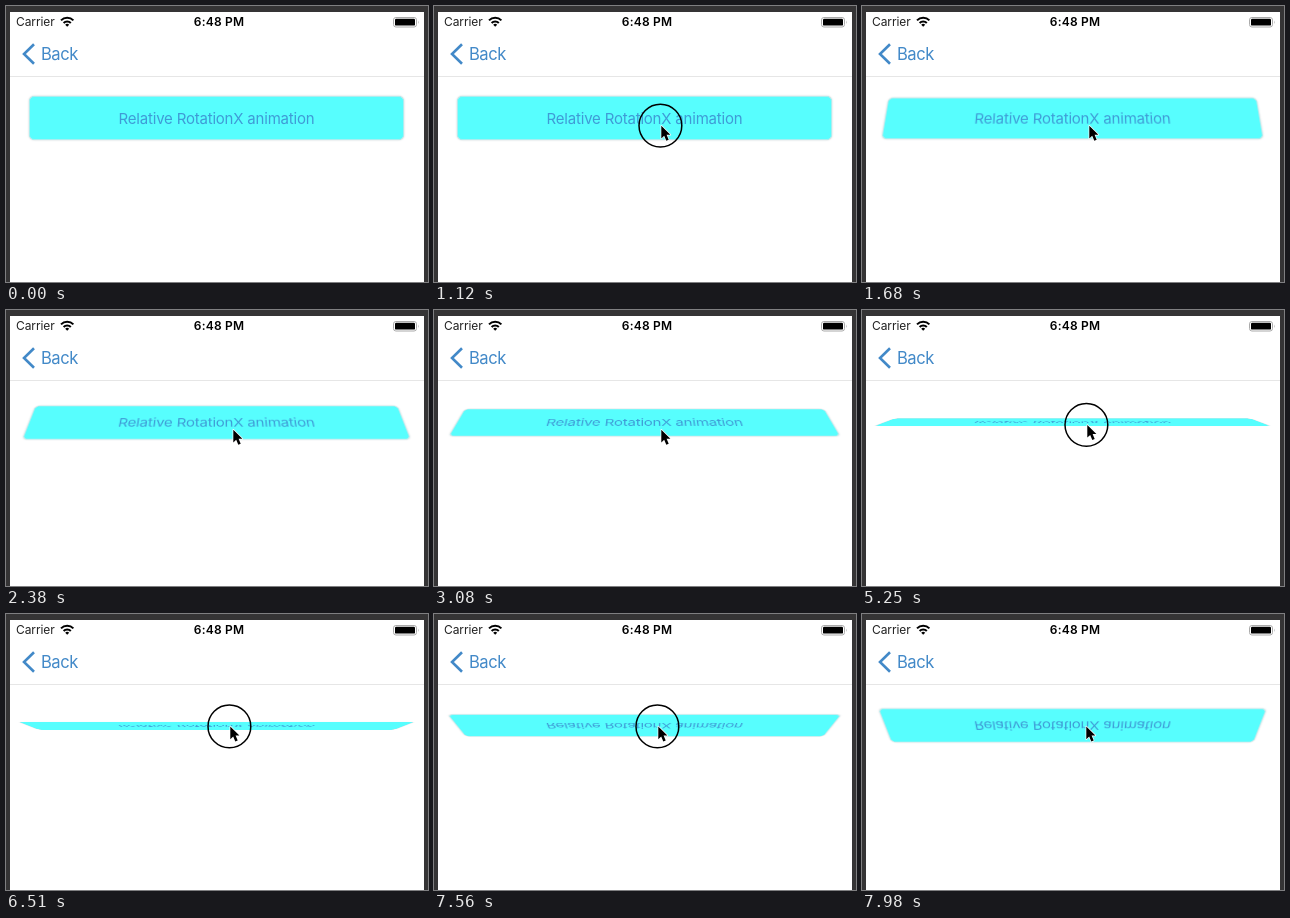
Animation, 422 px wide and 276 px high, one loop 8000 ms. Source, as an HTML page:

```html
<!DOCTYPE html>
<html lang="en">
<head>
<meta charset="utf-8">
<title>Relative RotationX animation</title>
<style>
  html, body { margin: 0; width: 100%; height: 100%; overflow: hidden; background: #353435; }
  body { position: relative; font-family: Inter, Roboto, sans-serif; }
  svg { position: absolute; left: 0; top: 0; width: 422px; height: 276px; }
  .button {
    position: absolute; left: 23px; top: 90px; width: 375px; height: 44px;
    box-sizing: border-box; border: 1px solid #a9eef0; border-radius: 5px;
    display: flex; align-items: center; justify-content: center;
    background: #57fefe; color: #3f9bd6;
    box-shadow: 0 0 2px rgba(110, 140, 145, .45);
    font-size: 15px; letter-spacing: -.2px; white-space: nowrap;
  }
</style>
</head>
<body>
<svg viewBox="0 0 422 276">
  <rect x="4" y="6" width="414" height="270" fill="#fff"/>
  <rect x="4" y="70" width="414" height="1" fill="#e6e6e6"/>
  <text x="10" y="20.4" font-size="12" fill="#222" letter-spacing="-.1">Carrier</text>
  <g fill="none" stroke="#000" stroke-width="2">
    <path d="M55 14.4a8.6 8.6 0 0 1 12.4 0"/>
    <path d="M57.6 17a5 5 0 0 1 7.2 0"/>
  </g>
  <path d="M59.2 18.7a2.8 2.8 0 0 1 4 0l-2 2.1z"/>
  <text x="213" y="20.4" font-size="12" font-weight="600" text-anchor="middle" letter-spacing=".2">6:48 PM</text>
  <rect x="387.5" y="11.5" width="23" height="9.5" rx="2.4" fill="#fff" stroke="#aaa"/>
  <rect x="389" y="12.8" width="20" height="6.8" rx="1.2"/>
  <path d="M412 14.4q1.4 1.8 0 3.6z" fill="#aaa"/>
  <path d="M28 38.2L18 48l10 9.8" fill="none" stroke="#4289c8" stroke-width="2.6"/>
  <text x="35" y="54" font-size="16.6" fill="#4289c8" letter-spacing="-.5">Back</text>
</svg>

<div class="button" id="button">Relative RotationX animation</div>

<svg viewBox="0 0 422 276">
  <g id="pointer">
    <circle id="ring" r="21.4" cx="-.4" cy=".4" fill="none" stroke="#000" stroke-width="1.5"/>
    <path d="M.5 .5V13.2L3.4 10.5 5.5 15.6 7.9 14.6 5.8 9.6H9.6z" stroke="#fff" stroke-width="1.4" paint-order="stroke" stroke-linejoin="round"/>
  </g>
</svg>

<script>
  const LOOP = 8000, STEP = 70;
  const HOLD = 150, TURN_DELAY = 135, TURN_TIME = 250, TURN = 20;

  const missedTap = 4530; // the edge-on button is too thin to hit
  const taps = [1120, 1970, 2800, 3640, missedTap, 5240, 6370, 7560];
  const nudges = [4200, 5000, 6140];

  const button = document.getElementById("button");
  const pointer = document.getElementById("pointer");
  const ring = document.getElementById("ring");

  const progress = (t, start, time) => Math.min(1, Math.max(0, (t - start) / time));
  const sum = (list, f) => list.reduce((total, item) => total + f(item), 0);

  // The pointer glides in from below, then creeps up by small nudges.
  function pointerAt(t) {
    const away = (1 - progress(t, 280, 490)) ** 2;
    const nudged = sum(nudges, start => progress(t, start, 200));
    return [226.8 + 64 * away - nudged, 119.2 + 171 * away - 2.4 * nudged];
  }

  const angleAt = t => sum(taps, tap =>
    tap === missedTap ? 0 : TURN * progress(t, tap + TURN_DELAY, TURN_TIME));

  function draw(now) {
    const t = Math.floor(now % LOOP / STEP) * STEP;
    const [x, y] = pointerAt(t);
    const pressed = taps.some(tap => t >= tap && t < tap + HOLD);
    pointer.setAttribute("transform", `translate(${x} ${y})`);
    ring.setAttribute("visibility", pressed ? "visible" : "hidden");
    button.style.transform = `perspective(400px) rotateX(${angleAt(t)}deg)`;
  }

  function tick() {
    draw(performance.now());
    requestAnimationFrame(tick);
  }
  tick();
</script>
</body>
</html>
```
